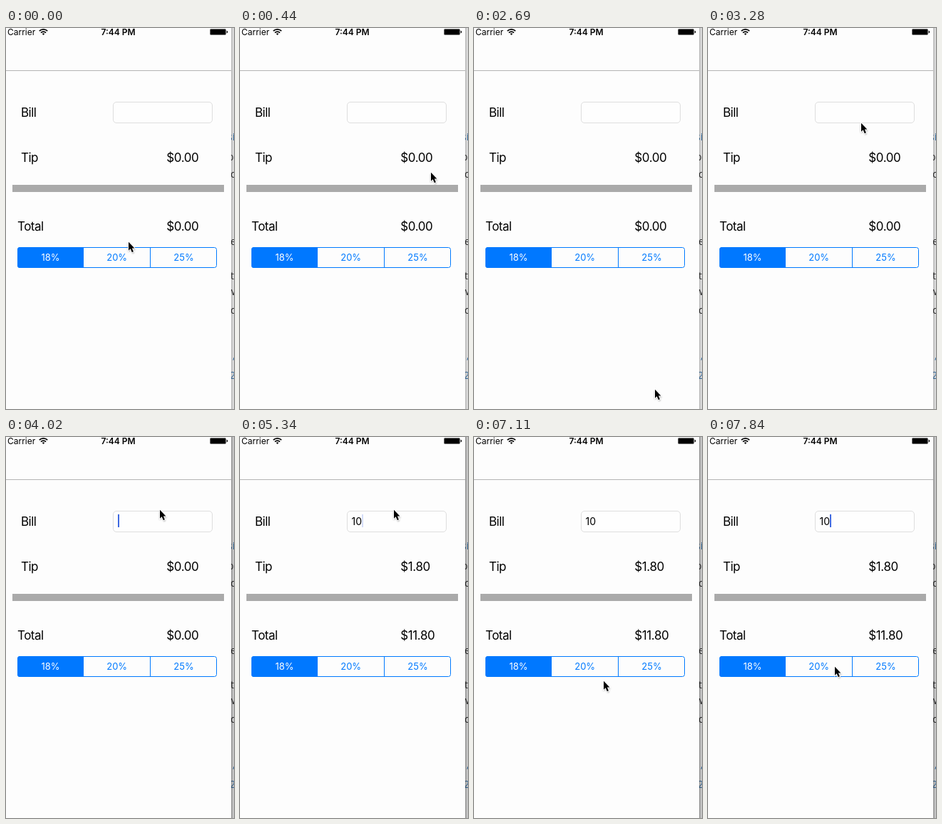
An HTML page for the animation above (7990 ms loop, 320x532 px).

```html
<!DOCTYPE html>
<html lang="en">
<head>
<meta charset="utf-8">
<title>Tip calculator</title>
<style>
  html, body { margin: 0; width: 100%; height: 100%; overflow: hidden; background: #fff; }
  svg { display: block; width: 320px; height: 532px; font-family: Inter, "Liberation Sans", sans-serif; }
  .label { font-size: 17px; letter-spacing: -.5px; }
  .money { letter-spacing: -.4px; }
  .status { font-size: 12px; }
  .seg { font-size: 13px; text-anchor: middle; fill: #007aff; }
  .page { font: 14px "Open Sans", sans-serif; fill: #333; }
  .link { fill: #3f7cb5; }
</style>
</head>
<body>
<svg viewBox="0 0 320 532">
  <defs>
    <linearGradient id="edge">
      <stop offset="0" stop-opacity=".6"/>
      <stop offset="1" stop-opacity=".25"/>
    </linearGradient>
    <filter id="soft" x="-50%" y="-50%" width="200%" height="200%">
      <feGaussianBlur stdDeviation=".8"/>
    </filter>
  </defs>

  <!-- page behind the window -->
  <rect width="320" height="532" fill="#fff"/>
  <g class="page">
    <text class="link" x="311" y="157">si</text>
    <text x="311" y="185">p</text>
    <text x="315" y="209">c</text>
    <text x="315" y="303">e</text>
    <text x="315" y="351">t</text>
    <text x="311" y="373">w</text>
    <text x="315" y="399">c</text>
    <text class="link" x="318" y="462">,</text>
    <text class="link" x="314" y="490">2</text>
  </g>
  <rect id="shade" x="316" width="4" height="532" fill="url(#edge)"/>

  <rect width="316" height="532" fill="#fdfdfd"/>
  <rect y="59" width="316" height="1" fill="#b4b4b4"/>

  <text class="status" x="2" y="10">Carrier</text>
  <g fill="none" stroke="#000" stroke-width="1.7">
    <path d="M46.8 4.2a8 8 0 0 1 11.4 0M49 6.6a4.9 4.9 0 0 1 7 0"/>
    <path d="M52.5 10l-1.8-1.9a2.6 2.6 0 0 1 3.6 0z" fill="#000" stroke="none"/>
  </g>
  <text class="status" x="157.5" y="10" font-weight="600" text-anchor="middle">7:44 PM</text>
  <rect x="286.5" y="1.5" width="22" height="8" rx="1.2" stroke="#777"/>
  <path d="M309.6 3.6q1.6 .4 1.6 1.9t-1.6 1.9z"/>

  <g class="label">
    <text x="21" y="124">Bill</text>
    <text x="21" y="187">Tip</text>
    <text x="16" y="283">Total</text>
    <text id="tip" class="money" x="225.3" y="187"></text>
    <text id="total" class="money" x="225.3" y="283"></text>
  </g>
  <rect x="9" y="219" width="297" height="10" fill="#aaa"/>

  <rect x="150.5" y="103.5" width="139" height="29" rx="4.5" fill="#fefefe" stroke="#dedede"/>
  <text id="bill" x="156.5" y="123" font-size="14"></text>
  <rect id="caret" y="108" width="2" height="18" fill="#3f69e0"/>

  <rect x="16.5" y="306.5" width="279" height="28" rx="3" fill="#fdfdfd" stroke="#007aff"/>
  <path d="M109 306H19.5a3.5 3.5 0 0 0-3.5 3.5v22a3.5 3.5 0 0 0 3.5 3.5H109z" fill="#0078ff"/>
  <path d="M202.5 306v29" stroke="#007aff"/>
  <text class="seg" x="62.5" y="325" style="fill:#fff">18%</text>
  <text class="seg" x="155.7" y="325">20%</text>
  <text class="seg" x="249.5" y="325">25%</text>

  <g id="cursor">
    <path d="M1.5 3V16L5 13L7.5 18L10 17L7.6 12.4H12z" opacity=".4" filter="url(#soft)"/>
    <path d="M2 1.8V13.8L4.7 11.3L6.8 16.2L8.9 15.3L6.9 10.6H10.4z" stroke="#fff" stroke-width="2" paint-order="stroke"/>
  </g>
</svg>
<script>
const LOOP = 7990;
const STEPS = 54; // screen updates per loop
const STEP_S = LOOP / STEPS / 1000;
const $ = id => document.getElementById(id);
const clamp = v => Math.min(1, Math.max(0, v));

// pointer strokes in steps; each starts where the previous one ended
const START = [170, 297];
const strokes = [
  { from: 0, to: 6, end: [230, 485], bend: [331, 8] },
  { from: 18, to: 22, end: [213, 131], bend: [255, 300], start: [252, 503], ease: 4 },
  { from: 24, to: 26, end: [214, 100] },
  { from: 39, to: 43, end: [184, 339], ease: 2 },
  { from: 43, to: 44, end: [181, 343] },
  { from: 47, to: 53, end: [176, 319] }
];
const FOCUS = 25, KEY1 = 35, KEY2 = 36;

function pointer(step) {
  let pos = START;
  for (const { from, to, end, start = pos, bend, ease = 1 } of strokes) {
    if (step < from) break;
    const u = 1 - (1 - clamp((step - from) / (to - from))) ** ease;
    pos = start.map((a, i) => {
      const b = end[i], c = bend ? bend[i] : (a + b) / 2;
      return (1 - u) ** 2 * a + 2 * u * (1 - u) * c + u * u * b;
    });
  }
  return pos.map(Math.round);
}

// the blink restarts at focus and at every key press
function caretAlpha(step) {
  const since = [KEY2, KEY1, FOCUS].find(s => s <= step);
  if (since === undefined) return 0;
  const age = (step - since) * STEP_S;
  return clamp(.85 + 1.6 * Math.cos(2 * Math.PI * (age - .315)));
}

const money = n => "$" + n.toFixed(2);
const setText = (id, s) => { if ($(id).textContent !== s) $(id).textContent = s; };

function draw(t) {
  const step = Math.floor(t / LOOP * STEPS + .1) % STEPS;
  const away = step > 6 && step < 18;
  $("cursor").setAttribute("transform", `translate(${pointer(step)})`);
  $("cursor").setAttribute("visibility", away ? "hidden" : "visible");

  const bill = "10".slice(0, Math.max(0, step - KEY1 + 1));
  setText("bill", bill);
  setText("tip", money(bill * .18));
  setText("total", money(bill * 1.18));
  $("caret").setAttribute("x", Math.round(156.5 + $("bill").getComputedTextLength()));
  $("caret").setAttribute("opacity", caretAlpha(step));

  // the window gains a deeper shadow once it is active
  $("shade").setAttribute("opacity", step < 23 ? .45 : .7);
}

function tick() {
  draw(performance.now() % LOOP);
  requestAnimationFrame(tick);
}
tick();
</script>
</body>
</html>
```
